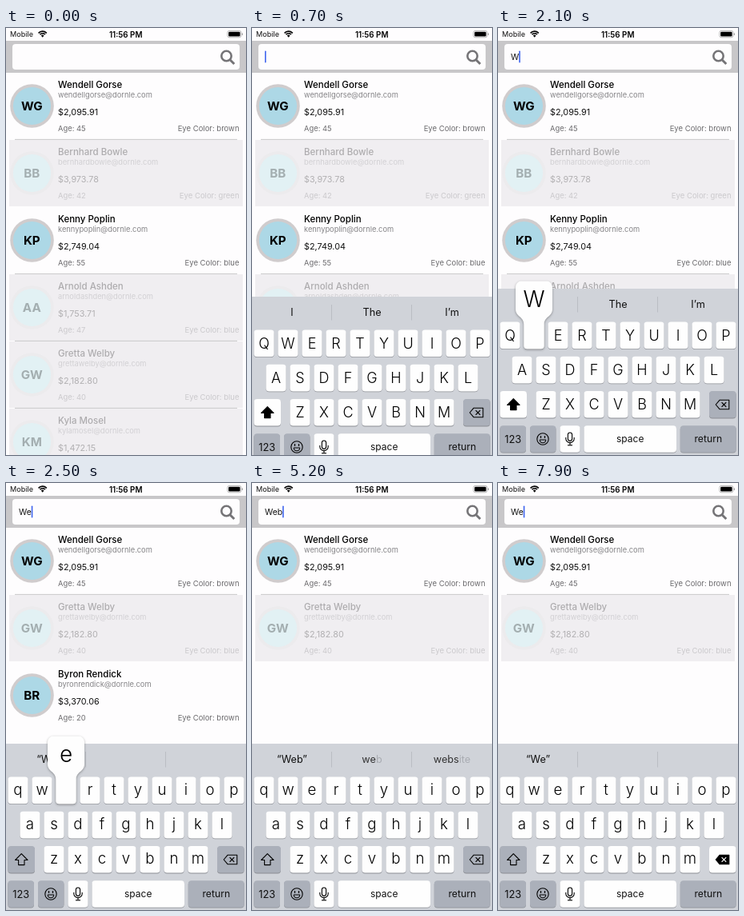
An HTML page with a canvas that plays this animation: 300 by 534 pixels, repeating every 8000 ms.

```html
<!DOCTYPE html>
<html lang="en">
<head>
<meta charset="utf-8">
<title>Contact search</title>
<style>
  html, body { margin: 0; width: 100%; height: 100%; overflow: hidden; background: #fefdfe; }
  canvas { display: block; width: 300px; height: 534px; }
</style>
</head>
<body>
<canvas id="stage"></canvas>
<script>
const W = 300, H = 534, LOOP = 8000, STEP = 100;
const KEY_TOP = 326;
const FONT = 'Inter, Roboto, sans-serif';
const canvas = document.getElementById('stage');
const ctx = canvas.getContext('2d');
const ratio = window.devicePixelRatio || 1;
canvas.width = W * ratio;
canvas.height = H * ratio;

// name, balance, age, eye color, dimmed
const people = [
  ['Wendell Gorse', '$2,095.91', 45, 'brown', false],
  ['Bernhard Bowle', '$3,973.78', 42, 'green', true],
  ['Kenny Poplin', '$2,749.04', 55, 'blue', false],
  ['Arnold Ashden', '$1,753.71', 47, 'blue', true],
  ['Gretta Welby', '$2,182.80', 40, 'blue', true],
  ['Kyla Mosel', '$1,472.15', 31, 'brown', true],
  ['Byron Rendick', '$3,370.06', 20, 'brown', false]
];

// Timelines: [start in ms, value]
const queries = [[0, ''], [2100, 'W'], [2500, 'We'], [4900, 'Web'], [6000, 'Webs'], [7400, 'Web'], [7800, 'We']];
const results = [[0, [0, 1, 2, 3, 4, 5]], [2200, [0, 4, 6]], [2600, [0, 4]], [6100, [0]], [7500, [0, 4]]];
const hints = [
  [0, ['I', 'The', 'I’m']],
  [2200, ['“W”']],
  [2600, ['“We”']], [2800, ['“We”', 'were', 'well']],
  [5000, ['“Web”']], [5200, ['“Web”', 'web', 'website']],
  [6100, ['“Webs”']], [6300, ['“Webs”', 'website', 'we should']],
  [7500, ['“Web”']], [7700, ['“Web”', 'web', 'website']],
  [7900, ['“We”']]
];
const presses = [[2000, 'W'], [2400, 'e'], [4800, 'b'], [5900, 's']];
const blinks = [[1000, 1400], [2000, 2400], [3100, 3500], [4100, 4500], [5500, 5900], [6600, 6900]];
const rows = [['qwertyuiop', 15, 367.6], ['asdfghjkl', 30, 410.8], ['zxcvbnm', 60, 454]];

const current = (line, t) => line.filter(e => e[0] <= t).pop();

function text(str, x, y, size, color, align = 'left', weight = 400) {
  ctx.font = `${weight} ${size}px ${FONT}`;
  ctx.fillStyle = color;
  ctx.textAlign = align;
  ctx.fillText(str, x, y);
}

function box(x, y, w, h, r, color) {
  ctx.fillStyle = color;
  ctx.beginPath();
  ctx.roundRect(x, y, w, h, r);
  ctx.fill();
}

function disc(x, y, r, color) {
  ctx.fillStyle = color;
  ctx.beginPath();
  ctx.arc(x, y, r, 0, Math.PI * 2);
  ctx.fill();
}

function stroke(width, color, path) {
  ctx.lineWidth = width;
  ctx.strokeStyle = color;
  ctx.beginPath();
  path();
  ctx.stroke();
}

function line(x1, y1, x2, y2, width, color) {
  stroke(width, color, () => { ctx.moveTo(x1, y1); ctx.lineTo(x2, y2); });
}

function drawStatus() {
  text('Mobile', 5, 11.4, 9.1, '#111');
  for (const r of [4.4, 7]) {
    stroke(1.7, '#000', () => ctx.arc(45.7, 11.2, r, -Math.PI * 0.76, -Math.PI * 0.24));
  }
  ctx.fillStyle = '#000';
  ctx.beginPath();
  ctx.moveTo(45.7, 11.8);
  ctx.arc(45.7, 11.2, 2.5, -Math.PI * 0.76, -Math.PI * 0.24);
  ctx.fill();
  text('11:56 PM', 149.7, 11.5, 9.8, '#000', 'center', 600);
  stroke(0.8, '#a5a5a5', () => ctx.roundRect(276.9, 3.4, 17, 8.4, 2.2));
  box(278.2, 4.7, 14.4, 5.8, 1.2, '#000');
  box(294.8, 6.2, 1.2, 2.8, 0.6, '#a5a5a5');
}

function caretAlpha(t) {
  if (t < 500) return 0;
  const typed = current(queries, t)[0];
  const blink = current(blinks, t);
  if (!blink || blink[0] < typed && typed > 0) return 1;
  const [out, back] = blink;
  if (t === out || t === back) return 0.6;
  return t < back ? 0 : 1;
}

function drawSearch(t) {
  box(0, 16, W, 40, 0, '#c8c7c9');
  box(8, 20, 284, 32, 4, '#fefdfe');
  stroke(2.6, '#757477', () => ctx.arc(275.5, 35, 6.2, 0, Math.PI * 2));
  line(280, 39.8, 285.3, 45, 3, '#757477');
  const query = current(queries, t)[1];
  text(query, 16, 40, 10.4, '#111');
  ctx.globalAlpha = caretAlpha(t);
  box(16 + ctx.measureText(query).width, 28.5, 1.6, 15, 0.8, '#3f65ee');
  ctx.globalAlpha = 1;
}

function drawPerson([name, balance, age, eye, dim], y) {
  if (dim) {
    box(4, y, 292, 83, 0, '#f0eef1');
    line(11, y - 0.6, 289, y - 0.6, 0.8, '#bcbbbd');
  }
  const cy = y + 41.5;
  disc(32.5, cy, 27.3, dim ? '#ecebed' : '#d0cccd');
  disc(32.5, cy, 23.6, dim ? '#e2f1f4' : '#add8e6');
  const initials = name.split(' ').map(part => part[0]).join('');
  const email = name.toLowerCase().replace(' ', '') + '@dornle.com';
  ctx.globalAlpha = dim ? 0.28 : 1;
  text(initials, 32.3, cy + 5.4, 15.2, '#000', 'center', 700);
  text(name, 65, y + 19.2, 11.5, '#000', 'left', 500);
  text(email, 65, y + 31.2, 9.3, '#858487');
  text(balance, 65, y + 53, 10.8, '#111');
  text('Age: ' + age, 65, y + 73, 9.4, '#6c6b6e');
  text('Eye Color: ' + eye, 291.5, y + 73, 9.5, '#6c6b6e', 'right');
  ctx.globalAlpha = 1;
}

function keycap(x, y, w, color) {
  box(x, y + 0.8, w, 33.6, 4, '#8b8e94');
  box(x, y, w, 33.6, 4, color);
}

function drawHints(t) {
  const [start, words] = current(hints, t);
  const arriving = start > 0 && t === start;
  words.forEach((word, i) => {
    const x = 50 + i * 100;
    if (!arriving || i === 0) return text(word, x, 350.3, 12.7, '#111', 'center');
    const split = Math.ceil(word.length * 0.55);
    const head = word.slice(0, split);
    ctx.font = `400 12.7px ${FONT}`;
    const left = x - ctx.measureText(word).width / 2;
    const offset = ctx.measureText(head).width;
    text(head, left, 350.3, 12.7, '#333');
    text(word.slice(split), left + offset, 350.3, 12.7, '#a9acb2');
  });
  for (const x of [99.5, 199.5]) line(x, 336, x, 355.5, 0.8, '#b5b8bf');
}

function drawShift(upper) {
  keycap(2.4, 454, 33.6, upper ? '#fefefe' : '#abb0ba');
  const arrow = () => {
    ctx.moveTo(19.3, 463.6);
    for (const [x, y] of [[27, 471.5], [23, 471.5], [23, 477.6], [15.6, 477.6], [15.6, 471.5], [11.6, 471.5]]) ctx.lineTo(x, y);
    ctx.closePath();
  };
  ctx.lineJoin = 'round';
  stroke(1.1, '#000', arrow);
  ctx.fillStyle = '#000';
  if (upper) ctx.fill();
}

function drawDelete(down) {
  keycap(264, 454, 33.6, down ? '#fefefe' : '#abb0ba');
  const shape = () => {
    ctx.moveTo(272.2, 471);
    ctx.lineTo(277.2, 465.2);
    ctx.lineTo(288.8, 465.2);
    ctx.lineTo(288.8, 476.8);
    ctx.lineTo(277.2, 476.8);
    ctx.closePath();
  };
  stroke(1.1, '#000', shape);
  ctx.fillStyle = '#000';
  if (down) ctx.fill();
  const color = down ? '#fff' : '#000';
  line(279.6, 468.2, 285.2, 473.8, 1.2, color);
  line(285.2, 468.2, 279.6, 473.8, 1.2, color);
}

function drawBottomRow() {
  const y = 497.2;
  keycap(2.4, y, 32.6, '#abb0ba');
  text('123', 18.8, 518.8, 12.8, '#111', 'center');
  keycap(40, y, 32.4, '#abb0ba');
  stroke(1.1, '#000', () => ctx.arc(56, 514, 7.2, 0, Math.PI * 2));
  box(52.8, 510, 1.4, 3, 0.7, '#000');
  box(57.8, 510, 1.4, 3, 0.7, '#000');
  stroke(1, '#000', () => { ctx.arc(56, 515, 3.9, 0, Math.PI); ctx.closePath(); });
  keycap(77.4, y, 25.2, '#fefefe');
  stroke(1.1, '#000', () => ctx.roundRect(87.4, 506, 5.2, 10.4, 2.6));
  stroke(1.1, '#000', () => {
    ctx.moveTo(84.8, 512);
    ctx.lineTo(84.8, 513.4);
    ctx.arc(90, 513.4, 5.2, Math.PI, 0, true);
    ctx.lineTo(95.2, 512);
  });
  line(90, 518.6, 90, 521.8, 1.1, '#000');
  line(87, 521.8, 93, 521.8, 1.1, '#000');
  keycap(107.4, y, 115.6, '#fefefe');
  text('space', 165.2, 518, 12, '#111', 'center');
  keycap(227.8, y, 69.8, '#abb0ba');
  text('return', 262.8, 518, 12.2, '#111', 'center');
}

function drawPopup(letter) {
  const [letters, first, y] = rows.find(row => row[0].includes(letter.toLowerCase()));
  const x = first + 30 * letters.indexOf(letter.toLowerCase());
  const top = y - 51, neck = y + 3, bottom = y + 34;
  ctx.save();
  ctx.shadowColor = 'rgba(0,0,0,.35)';
  ctx.shadowBlur = 3 * ratio;
  ctx.shadowOffsetY = ratio;
  ctx.fillStyle = '#fefefe';
  ctx.beginPath();
  ctx.moveTo(x, top);
  ctx.arcTo(x + 23, top, x + 23, top + 20, 7);
  ctx.lineTo(x + 23, y - 16);
  ctx.bezierCurveTo(x + 23, y - 6, x + 12.7, y - 7, x + 12.7, neck);
  ctx.arcTo(x + 12.7, bottom, x, bottom, 4);
  ctx.arcTo(x - 12.7, bottom, x - 12.7, neck, 4);
  ctx.lineTo(x - 12.7, neck);
  ctx.bezierCurveTo(x - 12.7, y - 7, x - 23, y - 6, x - 23, y - 16);
  ctx.arcTo(x - 23, top, x, top, 7);
  ctx.closePath();
  ctx.fill();
  ctx.restore();
  text(letter, x, y - 19, 28, '#000', 'center', 300);
}

function drawKeyboard(t) {
  if (t < 500) return;
  // critically damped spring
  const a = 18.3 * (t - 440) / 1000;
  const upper = t < 2200;
  ctx.save();
  ctx.translate(0, Math.round((H - KEY_TOP) * (1 + a) * Math.exp(-a)));
  box(0, KEY_TOP, W, H - KEY_TOP, 0, '#d0d3d9');
  drawHints(t);
  for (const [letters, first, y] of rows) {
    [...letters].forEach((letter, i) => {
      const x = first + 30 * i;
      keycap(x - 12.6, y, 25.2, '#fefefe');
      if (upper) text(letter.toUpperCase(), x, y + 23.3, 18, '#000', 'center', 350);
      else text(letter, x, y + 22.1, 18.7, '#000', 'center', 300);
    });
  }
  drawShift(upper);
  drawDelete(t >= 7400);
  drawBottomRow();
  const press = current(presses, t);
  if (press && t < press[0] + 200) drawPopup(press[1]);
  ctx.restore();
}

function draw(now) {
  const t = Math.floor(now % LOOP / STEP) * STEP;
  ctx.setTransform(ratio, 0, 0, ratio, 0, 0);
  box(0, 0, W, H, 0, '#fefdfe');
  current(results, t)[1].forEach((id, i) => drawPerson(people[id], 56 + 84 * i));
  drawStatus();
  drawSearch(t);
  drawKeyboard(t);
}

const begin = performance.now();
function tick() {
  draw(performance.now() - begin);
  requestAnimationFrame(tick);
}
tick();
</script>
</body>
</html>
```
